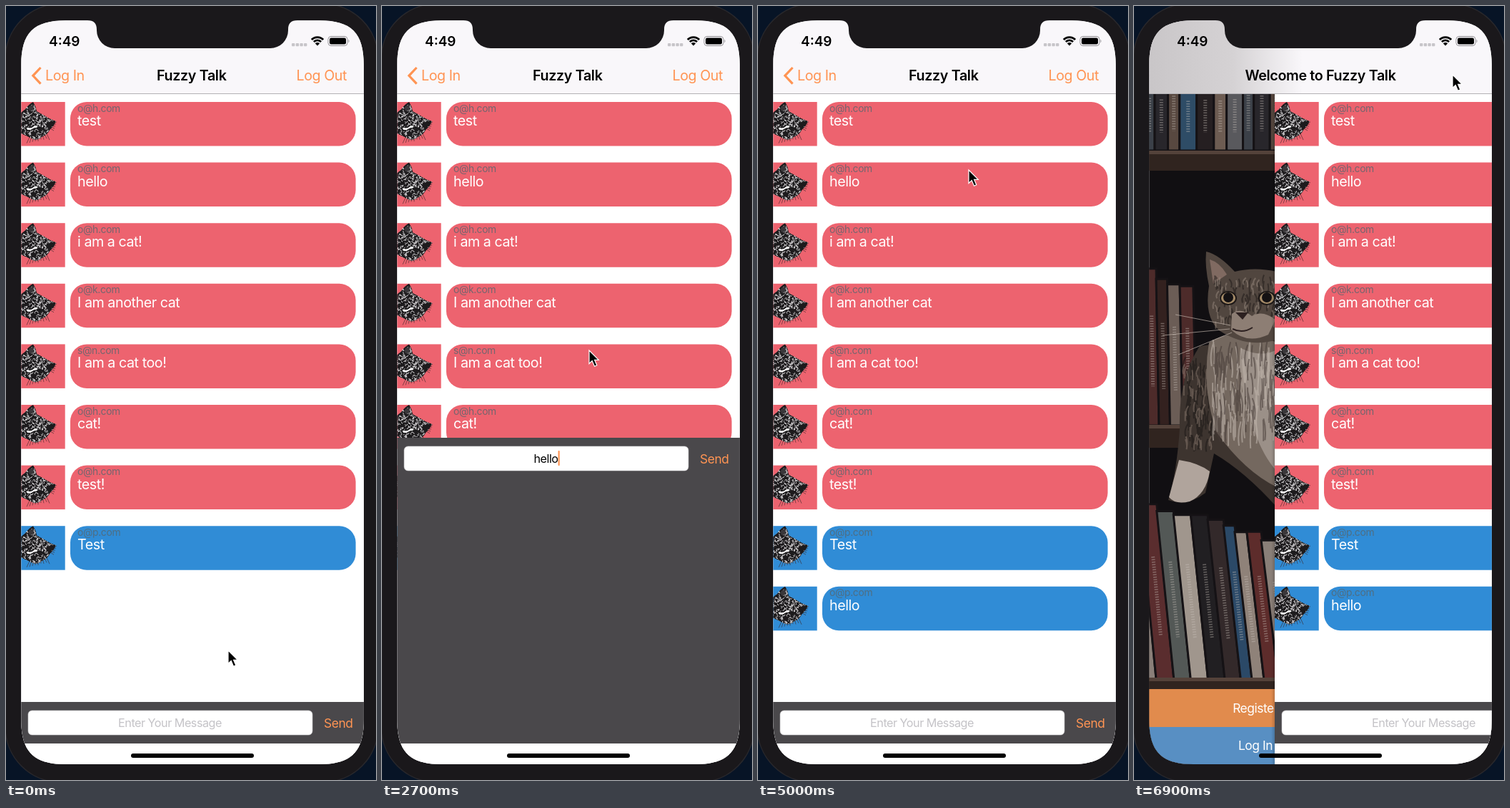
These frames come from a looping animation (518x1081 px, 7 s). An HTML page:

```html
<!DOCTYPE html>
<html lang="en">
<head>
<meta charset="utf-8">
<title>Chat demo</title>
<style>
  html, body { margin: 0; width: 100%; height: 100%; overflow: hidden; background: #071426; }
  svg { display: block; width: 518px; height: 1081px; }
  text { font-family: Inter, "Liberation Sans", sans-serif; font-size: 19.7px; letter-spacing: -.46px; }
  .title { font-weight: 600; letter-spacing: -.35px; }
  .tint { fill: #ff9453; }
  .mail { font-size: 13.9px; letter-spacing: -.35px; fill: #56666e; fill-opacity: .8; }
  .msg { fill: #fff; }
  .field { font-size: 16.2px; letter-spacing: -.5px; text-anchor: middle; }
  .button { font-size: 17.4px; letter-spacing: -.45px; }
</style>
</head>
<body>
<svg id="stage" viewBox="0 0 518 1081"></svg>
<script>
const LOOP = 7000, STEP = 100;
const BAR_LOW = 972, BAR_HIGH = 603;
const APP = 'Fuzzy Talk';
const PINK = '#ed636f', BLUE = '#308cd6';
const MESSAGES = [
  ['o@h.com', 'test', PINK], ['o@h.com', 'hello', PINK], ['o@h.com', 'i am a cat!', PINK],
  ['o@k.com', 'I am another cat', PINK], ['s@n.com', 'I am a cat too!', PINK],
  ['o@h.com', 'cat!', PINK], ['o@h.com', 'test!', PINK],
  ['o@p.com', 'Test', BLUE], ['o@p.com', 'hello', BLUE]
];
// Pointer: time, x, y
const POINTER = [
  [0, 310, 899], [300, 240, 1003], [700, 236, 1007], [1900, 236, 1007], [2700, 289, 480],
  [3500, 464, 635], [4200, 464, 635], [5000, 294, 228], [5500, 320, 205], [6400, 445, 95], [7000, 445, 95]
];
const TYPED = [1300, 1500, 1700, 1900, 2100];
const FOCUS = 353, SEND = 3964, RECEIVED = 4200, POP = 6800, SLIDE = 6900;

function seeded(seed) {
  return () => (seed = (seed * 16807) % 2147483647) / 2147483647;
}
const rect = (x, y, w, h, fill, r = 0, more = '') =>
  `<rect x="${x}" y="${y}" width="${w}" height="${h}" rx="${r}" fill="${fill}" ${more}/>`;
const text = (x, y, cls, str, more = '') => `<text x="${x}" y="${y}" class="${cls}" ${more}>${str}</text>`;
const path = (d, fill, more = '') => `<path d="${d}" fill="${fill}" ${more}/>`;
const line = (d, color, width, alpha = 1) =>
  path(d, 'none', `stroke="${color}" stroke-width="${width}" stroke-opacity="${alpha}"`);

// Rounded box whose corners ease into the straight sides
function smoothBox(x, y, w, h, e) {
  const k = e * .72;
  return `M${x + e} ${y}h${w - 2 * e}c${k} 0 ${e} ${e - k} ${e} ${e}v${h - 2 * e}c0 ${k} ${k - e} ${e} ${-e} ${e}` +
    `h${2 * e - w}c${-k} 0 ${-e} ${k - e} ${-e} ${-e}v${2 * e - h}c0 ${-k} ${e - k} ${-e} ${e} ${-e}Z`;
}

function catHead() {
  const rnd = seeded(77);
  const shape = 'M0 15L6 10Q11 3 17 0Q21 6 22 13L31 18Q40 24 49 27Q46 34 41 38Q37 46 29 49Q21 56 13 50L0 44Z';
  let curls = '', hairs = '';
  for (let i = 0; i < 300; i++) {
    const x = rnd() * 49, y = 3 + rnd() * 50, a = rnd() * 6.3, s = 1 + rnd() * 1.5;
    curls += `M${x.toFixed(1)} ${y.toFixed(1)}q${(Math.cos(a) * s).toFixed(1)} ${(Math.sin(a) * s).toFixed(1)} ` +
      `${(Math.cos(a + 1) * s * 1.5).toFixed(1)} ${(Math.sin(a + 1) * s * 1.5).toFixed(1)}`;
  }
  for (let i = 0; i < 9; i++) hairs += `M${12 + i * 3} ${49 - i * .6}l${i - 4} ${6 + rnd() * 3}`;
  for (let i = 0; i < 5; i++) hairs += `M${41 + i} ${37 - i * 2}l5 ${3 - i}`;
  return line(hairs, '#3b2729', .6) + path(shape, '#1d1b1d') +
    `<g clip-path="url(#headClip)">${line(curls, '#f0eef0', .85)}</g>` +
    path('M10 8L17 3L18 11L12 13Z', '#3a373a') +
    path('M7 37Q8 34 12 36Q16 36 19 32.5Q24 32 24 35Q22 37 18 37Q13 41 9 39.5Z', '#fbf9fb', 'stroke="#111" stroke-width="1"') +
    `<clipPath id="headClip">${path(shape, '#000')}</clipPath>`;
}

function books(x, end, top, slope, bottom, lean, colors, seed) {
  const rnd = seeded(seed), left = x;
  let out = '';
  for (let i = 0; x < end; i++) {
    const w = 15 + rnd() * 10, y = top + (x - left) * slope + rnd() * 14, h = bottom - y;
    out += path(`M${x} ${y}h${w}l${lean} ${h}h${-w}Z`, colors[i % colors.length], 'stroke="#151215" stroke-width="3"');
    out += path(`M${x + w / 2 + lean * .3} ${y + h * .3}l${lean * .45} ${h * .45}`, 'none',
      'stroke="#c9c0b8" stroke-opacity=".4" stroke-width="5" stroke-dasharray="1.5 2"');
    x += w;
  }
  return out;
}

// Loose strands of hair inside a box
function fur(n, x, y, w, h, len, color, seed) {
  const rnd = seeded(seed);
  let d = '';
  for (let i = 0; i < n; i++) {
    const sway = (rnd() - .5) * 12;
    d += `M${(x + rnd() * w).toFixed(1)} ${(y + rnd() * h).toFixed(1)}q${sway.toFixed(1)} ${len / 2} ${(sway / 2).toFixed(1)} ${len}`;
  }
  return line(d, color, 2, .55);
}

const eye = x => `<ellipse cx="${x}" cy="408" rx="11" ry="9" fill="#a58b68" stroke="#1d1817" stroke-width="2"/>` +
  `<circle cx="${x}" cy="407" r="7" fill="#141113"/>`;

function photo() {
  const shelf = (y, h) => rect(21, y, 200, h, '#30241f') + rect(21, y, 200, 5, '#54423a');
  return rect(21, 20, 200, 1039, '#110f12') +
    books(14, 205, 90, 0, 202, 0, ['#3b4048', '#28262b', '#584840', '#2e4c66', '#251f21', '#6d5c52', '#59595d'], 19) +
    shelf(202, 28) +
    books(16, 76, 366, .4, 586, 4, ['#4d2b2a', '#33211f', '#6b5d56'], 8) +
    shelf(585, 32) +
    path('M64 590Q62 520 92 475L200 460V700Q155 650 112 625L100 680Q74 700 48 690Q60 650 64 590Z', '#3d342f') +
    fur(90, 72, 490, 40, 120, 18, '#1d1817', 5) + fur(40, 70, 495, 38, 115, 14, '#85756a', 6) +
    path('M105 470Q145 445 200 470V672Q155 650 116 596Q94 535 105 470Z', '#74685f') +
    path('M150 478Q178 492 200 480V650Q155 600 150 478Z', '#9b9088') +
    fur(90, 110, 465, 85, 120, 34, '#c3b9b0', 11) + fur(70, 110, 465, 85, 120, 30, '#443a35', 12) +
    path('M63 634Q90 638 106 650Q101 682 78 692Q58 697 49 686Z', '#b0a49c') +
    path('M101 343Q119 347 141 371Q169 364 200 371V466Q159 479 119 453Q98 434 105 391Q99 363 101 343Z', '#51463f') +
    path('M106 354Q120 358 130 375L111 388Z', '#806a61') +
    fur(60, 112, 375, 85, 60, 12, '#221c1b', 3) + fur(45, 112, 378, 85, 65, 10, '#94857a', 4) +
    path('M137 430Q149 420 165 433Q180 424 198 438L188 459Q158 473 136 452Z', '#8d7e74') +
    eye(132) + eye(186) + path('M142 428h18l-8 10Z', '#2c2020') +
    line('M138 451q14 7 28-2', '#2c2020', 2) +
    line('M135 446L58 431M134 451L40 460M137 456L62 487', '#c9bdb4', 1, .65) +
    books(-8, 200, 680, .3, 940, 24, ['#8a7f78', '#5a2d2e', '#535856', '#a0968d', '#211f22', '#33292a', '#2b4967', '#8f8279', '#5d2c2b'], 41) +
    shelf(938, 18) +
    rect(21, 954, 200, 53, '#e18b4d') + rect(21, 1007, 200, 52, '#588fc3') +
    text(170, 987, 'button msg', 'Register', 'text-anchor="middle"') +
    text(170, 1039, 'button msg', 'Log In', 'text-anchor="middle"');
}

function cell([mail, msg, color], i) {
  return `<g class="cell" transform="translate(0 ${134 + 84.6 * i})">` +
    rect(21, 0, 61.7, 61.5, color) + '<use href="#cat" x="21"/>' + rect(90, 0, 399.6, 61.5, color, 23) +
    text(100, 13.5, 'mail', mail) + text(100, 33, 'msg', msg) + '</g>';
}

function statusBar() {
  const arc = r => line(`M${436 - r * .72} ${55 - r * .7}A${r} ${r} 0 0 1 ${436 + r * .72} ${55 - r * .7}`, '#000', 2.7);
  return text(60, 56, 'title', '4:49', 'style="font-size:19px;letter-spacing:0"') +
    [400, 405.7, 411.4, 417].map(x => rect(x, 52, 4.4, 4.2, '#c7c5c9', 1)).join('') +
    arc(11.4) + arc(7.1) + path('M436 55.5l-3.2-3.3a4.6 4.6 0 0 1 6.4 0Z', '#000') +
    rect(451, 42.5, 27, 13, 'none', 4, 'stroke="#929094"') + rect(453, 44.5, 23, 9, '#000', 2.2) +
    path('M479.5 46.5q2 2.5 0 5Z', '#929094');
}

const stage = document.getElementById('stage');
stage.innerHTML = `<defs>
    <clipPath id="screen">${path(smoothBox(21.3, 20.3, 479.6, 1038.7, 62), '#000')}</clipPath>
    <clipPath id="tile">${rect(0, 0, 61.7, 61.5, '#000')}</clipPath>
    <g id="cat" clip-path="url(#tile)">${catHead()}</g>
    <linearGradient id="haze"><stop stop-color="#c9c6c8"/><stop offset=".55" stop-color="#d5d2d4"/>
      <stop offset="1" stop-color="#f9f7fa"/></linearGradient>
    <linearGradient id="edge"><stop stop-color="#000" stop-opacity="0"/><stop offset="1" stop-color="#000" stop-opacity=".18"/></linearGradient>
  </defs>` +
  rect(-1, -3, 522, 1087, '#1a181b', 77, 'stroke="#29282c" stroke-width="1.5"') +
  `<g clip-path="url(#screen)">${rect(21, 20, 480, 1039, '#fff')}
    <g id="photo">${photo()}</g>
    <g id="page">${rect(16, 123, 5, 936, 'url(#edge)')}${rect(21, 123, 480, 936, '#fff')}
      ${MESSAGES.map(cell).join('')}
      <g id="bar">${rect(21, 0, 480, 58, '#4a484b', 0, 'id="panel"')}
        ${rect(31, 12, 398, 34, '#fff', 5.5, 'id="box" stroke="#d2d0d4" stroke-width=".6"')}
        ${text(229.5, 34.5, 'field', 'Enter Your Message', 'id="hint" fill="#c4c3c7"')}
        ${text(229.5, 34.5, 'field', '', 'id="draft" fill="#000"')}
        ${rect(0, 18, 2.2, 21, '#ff9453', 1, 'id="caret"')}
        ${text(445, 35.5, 'button', 'Send', 'id="send"')}
      </g>
    </g>
    ${rect(21, 20, 480, 102.5, '#f9f7fa')}
    ${rect(21, 20, 215, 102.5, 'url(#haze)', 0, 'id="blur"')}
    ${rect(21, 122, 480, 1, '#b3b1b5')}
    ${statusBar()}
    <g id="nav">
      <path id="chevron" d="M48.5 86L37.8 97.3L48.5 108.6" fill="none" stroke="#ff9453" stroke-width="3.2"/>
      ${text(55, 104, 'tint', 'Log In', 'id="back"')}
      ${text(211, 104, 'title', APP, 'id="title"')}
      ${text(406.5, 104, 'tint', 'Log Out', 'id="logout"')}
    </g>
    ${text(261, 104, 'title', 'Welcome to ' + APP, 'id="welcome" text-anchor="middle"')}
    ${rect(175, 1044, 172, 6, '#000', 3)}
  </g>` +
  path('M114 19V20C123 20 127 24 127 33V34A25 25 0 0 0 152 59H370A25 25 0 0 0 395 34V33C395 24 399 20 408 20V19Z', '#1a181b') +
  `<g id="pointer">${path('M1 1V19.5L5.2 15.6L8.5 23.2L11.8 21.8L8.6 14.3H14.3Z', '#000', 'stroke="#fff" stroke-width="1.2"')}</g>`;

const ui = {};
stage.querySelectorAll('g[id], rect[id], text[id], path[id]').forEach(el => ui[el.id] = el);
const cells = stage.querySelectorAll('.cell');
const set = (el, attrs) => Object.entries(attrs).forEach(([k, v]) => el.setAttribute(k, v));
const show = (el, on) => el.setAttribute('visibility', on ? 'visible' : 'hidden');

const smooth = p => { p = Math.min(1, Math.max(0, p)); return p * p * (3 - 2 * p); };

function pointerAt(t) {
  const i = POINTER.findIndex(k => k[0] > t);
  const [t0, x0, y0] = POINTER[i - 1], [t1, x1, y1] = POINTER[i];
  const p = smooth((t - t0) / (t1 - t0));
  return `translate(${x0 + (x1 - x0) * p} ${y0 + (y1 - y0) * p})`;
}

function drawBar(t) {
  const lift = smooth((t - FOCUS) / 500) - smooth((t - SEND) / 500);
  const top = BAR_LOW + (BAR_HIGH - BAR_LOW) * lift;
  const busy = t >= SEND && t < RECEIVED, editing = t >= FOCUS && t < SEND;
  const draft = t < RECEIVED ? 'hello'.slice(0, TYPED.filter(at => at <= t).length) : '';
  const typing = t >= TYPED[0] && t < TYPED[4] + 300;
  ui.bar.setAttribute('transform', `translate(0 ${top})`);
  ui.panel.setAttribute('height', 1030 - top);
  ui.box.setAttribute('fill', busy ? '#f8f6f9' : '#fff');
  set(ui.draft, { x: busy ? 223.5 : 229.5, y: busy ? 33.5 : 34.5 });
  ui.draft.textContent = draft;
  show(ui.hint, !draft);
  show(ui.caret, editing && (typing || t % 1000 >= 500));
  ui.caret.setAttribute('x', draft ? 229.5 + ui.draft.getComputedTextLength() / 2 : 153.3);
  ui.send.setAttribute('fill', busy ? '#5c5a5d' : '#ff9453');
}

function drawNav(t) {
  const fading = t >= POP, gone = t >= SLIDE;
  show(ui.nav, !gone);
  show(ui.welcome, fading);
  set(ui.welcome, { x: gone ? 261 : 225, opacity: gone ? 1 : .72 });
  set(ui.title, { x: fading ? 382 : 211, opacity: fading ? .45 : 1 });
  set(ui.back, { x: fading ? 120 : 55, opacity: fading ? .3 : 1 });
  ui.chevron.setAttribute('opacity', fading ? .42 : 1);
  ui.logout.setAttribute('opacity', fading ? 0 : 1);
  show(ui.blur, gone);
  show(ui.photo, gone);
  ui.page.setAttribute('transform', `translate(${gone ? 176 : 0} 0)`);
}

function render(now) {
  const t = Math.floor((now % LOOP) / STEP) * STEP;
  drawBar(t);
  drawNav(t);
  show(cells[8], t >= RECEIVED);
  ui.pointer.setAttribute('transform', pointerAt(t));
}

const start = performance.now();
function tick() {
  render(performance.now() - start);
  requestAnimationFrame(tick);
}
tick();
</script>
</body>
</html>
```
